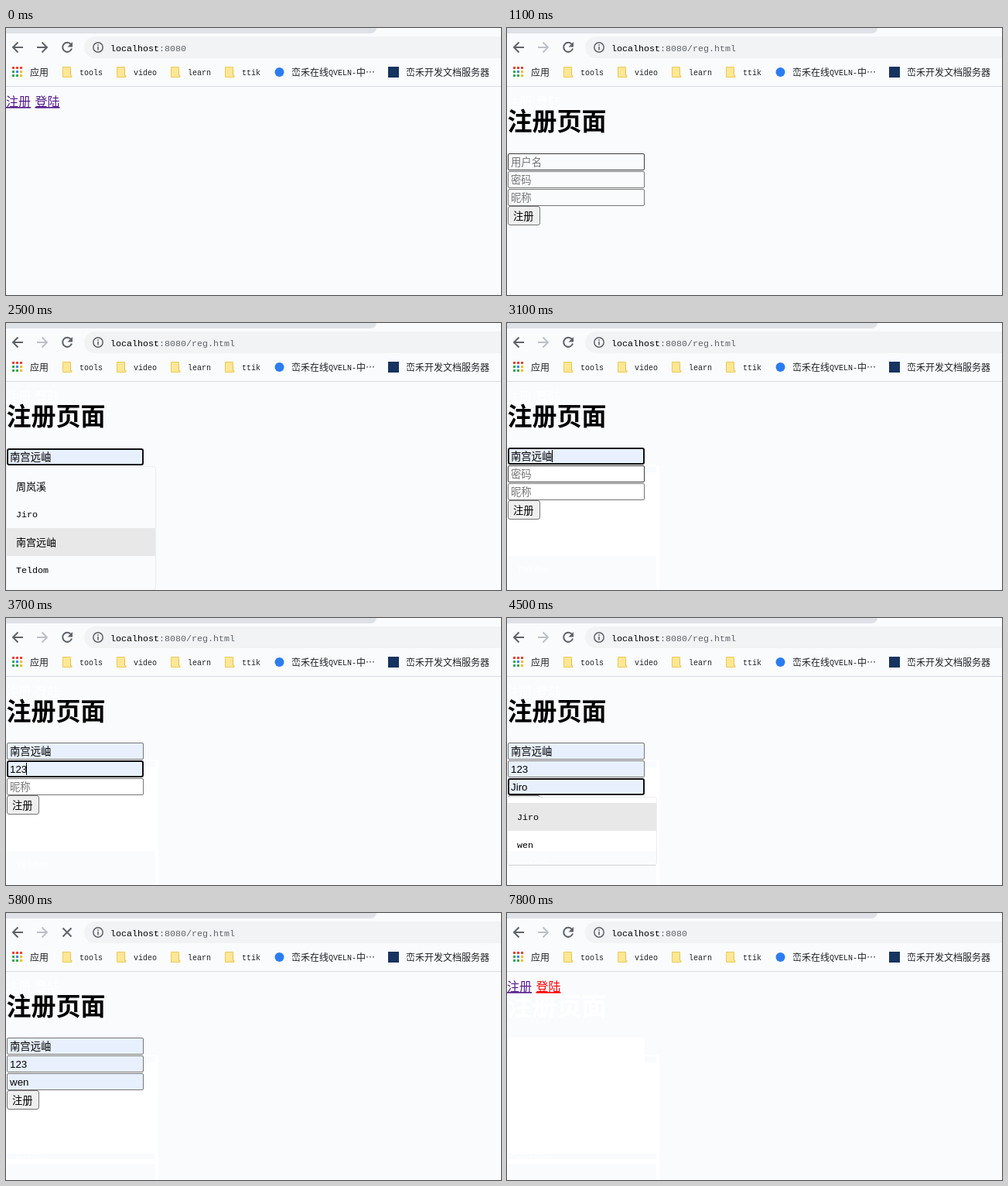
These frames come from a looping animation (640 by 345 pixels, 8000 ms). An HTML page:

```html
<!DOCTYPE html>
<html lang="zh-CN">
<head>
<meta charset="utf-8">
<style>
  html, body { margin: 0; width: 100%; height: 100%; overflow: hidden; background: #f9fbfd; }
  svg { display: block; width: 640px; height: 345px; }
  text { font-family: "Liberation Sans", "Noto Sans CJK SC", "Noto Sans CJK", sans-serif; white-space: pre; }
  .mono { font-family: "Liberation Mono", monospace; }
  .line { fill: none; stroke: #5f6368; stroke-width: 2; }
  .link { text-decoration: underline; }
  .title { font-weight: bold; }
</style>
</head>
<body>
<svg id="stage" viewBox="0 0 640 345"></svg>
<script>
const LOOP = 8000;
const PAPER = '#f9fbfd', FILLED = '#e8f0fe', VISITED = '#551a8b', ACTIVE = '#f00';
const PEOPLE = ['周岚溪', 'Jiro', '南宫远岫', 'Teldom'];
const NICKNAMES = ['Jiro', 'wen'];
const PLACEHOLDERS = ['用户名', '密码', '昵称'];
const MENUS = [PEOPLE, ['123'], NICKNAMES];

const START = {
  page: 'home', path: '', icon: 'reload', forward: '#5f6368', links: [VISITED, VISITED],
  top: 162, values: ['', '', ''], hover: -1, focus: -1, caret: '', menu: -1, item: -1,
  button: '#efefef', residue: 0
};

// Each step lists what changes at that time; everything else carries over.
const STEPS = [
  [100, { links: [ACTIVE, VISITED] }],
  [700, { icon: 'stop' }],
  [800, { page: 'register', path: '/reg.html', forward: '#bdc1c6', residue: 1 }],
  [900, { icon: 'reload' }],
  [1100, { hover: 0 }],
  [1600, { hover: -1, focus: 0, menu: 0, caret: 'start' }],
  [1800, { caret: '' }],
  [2300, { item: 0, values: [PEOPLE[0], '', ''] }],
  [2400, { item: 1, values: [PEOPLE[1], '', ''] }],
  [2500, { item: 2, values: [PEOPLE[2], '', ''] }],
  [2700, { menu: -1, item: -1, top: 161, caret: 'end', residue: 2 }],
  [2900, { hover: 2 }],
  [3100, { hover: 1 }],
  [3300, { hover: -1, focus: 1, menu: 1, caret: 'start' }],
  [3400, { item: 0, values: [PEOPLE[2], '123', ''], caret: '' }],
  [3700, { menu: -1, item: -1, caret: 'end' }],
  [3900, { focus: 2, menu: 2, caret: 'start' }],
  [4200, { item: 0, values: [PEOPLE[2], '123', NICKNAMES[0]] }],
  [4500, { caret: '' }],
  [4700, { item: 1, values: [PEOPLE[2], '123', NICKNAMES[1]] }],
  [5100, { menu: -1, item: -1, caret: 'end', residue: 3 }],
  [5300, { button: '#e5e5e5' }],
  [5400, { focus: -1, caret: '', button: '#f5f5f5' }],
  [5700, { button: '#efefef' }],
  [5800, { icon: 'stop' }],
  [7700, { page: 'home', path: '', icon: 'reload', links: [VISITED, VISITED], residue: 4 }],
  [7800, { links: [VISITED, ACTIVE] }]
];

const rect = (x, y, w, h, fill, more = '') =>
  `<rect x="${x}" y="${y}" width="${w}" height="${h}" fill="${fill}" ${more}/>`;
const path = (d, more = '') => `<path class="line" d="${d}" ${more}/>`;
const text = (x, y, size, fill, content, more = '') =>
  `<text x="${x}" y="${y}" font-size="${size}" fill="${fill}" ${more}>${content}</text>`;

// Latin runs sit on a fixed pitch, slightly raised; Chinese keeps the full size.
const mixed = (x, y, size, pitch, fill, content) => text(x, y, size, fill,
  content.replace(/[\x21-\x7e]+/g, run =>
    `<tspan class="mono" baseline-shift="1" font-size="${pitch / 0.6}">${run}</tspan>`));
const bookmark = (x, name) => mixed(x, 62, 12, 6, '#202124', name);

function folder(x, name) {
  return path(`M${x + .5} 50.5h10v11h1.5v2h-11.5z`, 'style="fill:#ffe794;stroke:#ecc95c;stroke-width:1"')
    + path(`M${x + 10.5} 54v7.5`, 'style="stroke:#e8c04a;stroke-width:1"')
    + bookmark(x + 22, name);
}

function bookmarks() {
  const red = '#ea4335', green = '#34a853', blue = '#4285f4', yellow = '#fbbc05';
  const dots = [red, red, red, green, blue, yellow, green, green, yellow]
    .map((color, i) => rect(8 + i % 3 * 5, 50 + Math.floor(i / 3) * 5, 3, 3, color)).join('');
  return dots + bookmark(31, '应用')
    + ['tools', 'video', 'learn', 'ttik'].map((name, i) => folder(73 + 70 * i, name)).join('')
    + '<circle cx="353.5" cy="57" r="6" fill="#2b7cf0"/>'
    + bookmark(369, '峦禾在线QVELN-中⋯')
    + rect(494, 50, 14, 14, '#17335f')
    + bookmark(517, '峦禾开发文档服务器');
}

function toolbar(s) {
  const reload = path('M84 21.2A6 6 0 1 0 85 26.5')
    + '<path d="M86 18v6.5h-6.5z" fill="#5f6368"/>';
  const stop = path('M73.5 19.5l11 11M84.5 19.5l-11 11');
  return '<path d="M0 0H479Q478 7 471 7H0Z" fill="#dee1e6"/>'
    + path('M22 25H9M15.5 18.5L9 25l6.5 6.5')
    + path('M40 25h13M46.5 18.5L53 25l-6.5 6.5', `style="stroke:${s.forward}"`)
    + (s.icon === 'stop' ? stop : reload)
    + rect(101, 11, 580, 28, '#f1f3f4', 'rx="14"')
    + '<circle class="line" cx="119" cy="25" r="6.2" style="stroke-width:1.5"/>'
    + rect(118.2, 24, 1.6, 4.5, '#5f6368') + rect(118.2, 21.3, 1.6, 1.6, '#5f6368')
    + text(135, 29.5, 7 / 0.6, '#000',
      `<tspan class="mono">localhost</tspan><tspan class="mono" fill="#5f6368">:8080${s.path}</tspan>`)
    + bookmarks() + rect(0, 75, 640, 1, '#dadce0');
}

const links = colors => ['注册', '登陆']
  .map((name, i) => text(37.5 * i, 101, 16, colors[i], name, 'class="link"')).join('');
const title = color => text(0.5, 132, 32, color, '注册页面', 'class="title"');

// White left behind where earlier content has been cleared.
function residue(level) {
  let out = '';
  if (level >= 1) out += links(['#fff', '#fff']);
  if (level >= 2) out += rect(0, 183, 197, 170, '#fff', 'rx="4"')
    + rect(178, 185, 15, 8, PAPER, 'rx="2"')
    + rect(1, 301, 192, 44, PAPER)
    + mixed(13, 323, 13, 7, '#fff', PEOPLE[3]);
  if (level >= 3) out += rect(1, 301, 192, 10, '#fff') + rect(0, 318, 197, 6, '#fff');
  if (level >= 4) out += title('#fff') + rect(1, 161, 177, 32, '#fff');
  return out;
}

function field(s, i) {
  const y = s.top + 23 * i, value = s.values[i], focused = s.focus === i;
  const fill = value ? FILLED : 'none';
  const box = focused
    ? rect(2, y + 1, 175, 20, fill, 'rx="2" stroke="#101010" stroke-width="2"')
    : rect(1.5, y + .5, 176, 21, fill, `rx="1.5" stroke="${s.hover === i ? '#3c3c3c' : '#767676'}"`);
  const label = text(5, y + 16, 13.333, value ? '#000' : '#757575', value || PLACEHOLDERS[i]);
  const width = [...value].reduce((sum, c) => sum + (c > '\xff' ? 13.333 : 7), 0);
  const caretX = s.caret === 'end' ? Math.floor(5 + width) : 5;
  return box + label + (focused && s.caret ? rect(caretX, y + 3, 1, 16, '#000') : '');
}

function menu(s) {
  if (s.menu < 0) return '';
  const items = MENUS[s.menu], top = 185 + 23 * s.menu, height = items.length * 36 + 16;
  const back = s.menu === 0
    ? rect(0, top, 194, height, PAPER)
    : rect(0, top, 194, Math.min(height, 301 - top), '#fff');
  const frame = rect(.5, top + .5, 193, height - .5, 'none', 'rx="3" stroke="#eceef0"')
    + rect(2, top + height, 190, 1, '#d6d7da');
  const rows = items.map((name, i) => {
    const y = top + 8 + 36 * i;
    return (s.item === i ? rect(1, y, 192, 36, '#e8e8e8') : '')
      + mixed(13, y + 22.5, 13, 7, '#000', name);
  });
  return back + frame + rows.join('');
}

function registerPage(s) {
  const y = s.top + 68;
  return title('#000') + [0, 1, 2].map(i => field(s, i)).join('')
    + rect(1.5, y + .5, 41, 24, s.button, 'rx="2.5" stroke="#767676"')
    + text(8, y + 17.5, 13.333, '#000', '注册') + menu(s);
}

const stage = document.getElementById('stage');
let shown = -1;

function draw(time) {
  const count = STEPS.filter(([start]) => start <= time).length;
  if (count === shown) return;
  shown = count;
  const s = Object.assign({}, START, ...STEPS.slice(0, count).map(step => step[1]));
  stage.innerHTML = rect(0, 0, 640, 345, PAPER) + toolbar(s) + residue(s.residue)
    + (s.page === 'home' ? links(s.links) : registerPage(s));
}

const begin = performance.now();
function tick() {
  draw((performance.now() - begin) % LOOP);
  requestAnimationFrame(tick);
}
tick();
</script>
</body>
</html>
```
